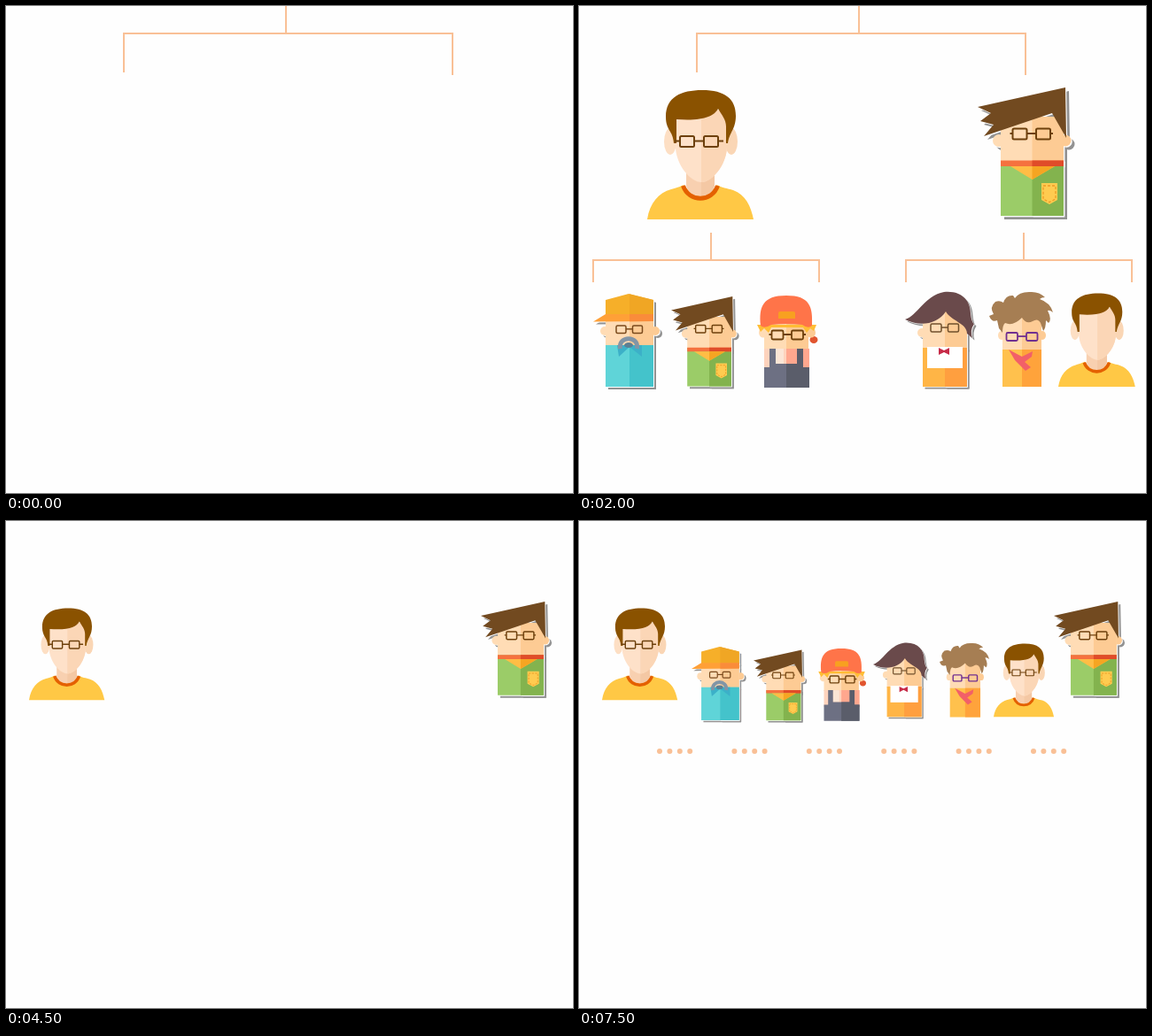
An HTML page with a canvas that plays this animation: 640 px wide and 550 px high, repeating every 8 s.

```html
<!DOCTYPE html>
<html lang="en">
<head>
<meta charset="utf-8">
<title>Team tree</title>
<style>
html, body { margin: 0; width: 100%; height: 100%; overflow: hidden; background: #fefefe; }
canvas { display: block; }
</style>
</head>
<body>
<canvas id="stage" width="640" height="550"></canvas>
<script>
const ctx = document.getElementById('stage').getContext('2d');
const LOOP = 8000;
const LINE = '#f9c096';
const SKIN = ['#ffdcb5', '#fdcb94'];
const BROWN = '#724a20';
let flat = null; // when set, every shape takes this colour (silhouettes)

function fill(d, color) {
  ctx.fillStyle = flat || color;
  ctx.fill(new Path2D(d));
}

// Left and right halves in two tones, divided at x.
function split(d, x, [left, right]) {
  fill(d, left);
  ctx.save();
  ctx.beginPath();
  ctx.rect(x, 0, 640, 550);
  ctx.clip();
  fill(d, right);
  ctx.restore();
}

function stroke(d, color, width, dash = []) {
  ctx.strokeStyle = flat || color;
  ctx.lineWidth = width;
  ctx.setLineDash(dash);
  ctx.stroke(new Path2D(d));
  ctx.setLineDash([]);
}

function oval(x, y, rx, ry, color) {
  ctx.fillStyle = flat || color;
  ctx.beginPath();
  ctx.ellipse(x, y, rx, ry, 0, 0, 2 * Math.PI);
  ctx.fill();
}

function glasses(x, y, w, h, gap, color, width = 1.7, arm = 0) {
  ctx.strokeStyle = flat || color;
  ctx.lineWidth = width;
  ctx.beginPath();
  ctx.roundRect(x, y, w, h, 1.5);
  ctx.roundRect(x + w + gap, y, w, h, 1.5);
  ctx.stroke();
  const mid = y + h * 0.45;
  stroke(`M${x - arm},${mid}H${x}M${x + w},${mid}h${gap}m${w},0h${arm}`, color, width);
}

function manBare() {
  oval(103, 153, 7, 15, '#fddfc4');
  oval(172, 153, 7, 15, '#fad6b5');
  fill('M77,241C80,222 90,211 104,207C112,205 116,203 118,202C124,214 150,214 156,202C160,205 168,206 174,208C188,213 194,226 197,241Z', '#ffc845');
  split('M121,186H153V203Q150,215 137,215Q124,215 121,203Z', 138, ['#f8d0b0', '#f4c8a4']);
  stroke('M117.5,203C124,222 150,222 156.5,203', '#e46000', 5);
  split('M109,125C109,112 167,112 167,125V160C166,180 150,199 138,199C126,199 110,180 109,160Z', 138, ['#fee1c9', '#fbd6b6']);
  fill('M107,155C106,140 98,141 98,125C98,103 115,95 139,95C165,95 177,105 177,124C177,139 170,142 168,155H166V136C166,128 161,123 157,116C152,125 140,130 110,128V155Z', '#8a5200');
}

function man() {
  manBare();
  glasses(114, 147, 16, 12, 11, '#6d400c', 2, 6);
}

function green() {
  oval(474, 152, 7, 7, '#ffdcb5');
  oval(549, 152, 6.5, 6.5, '#fdcb94');
  split('M476,125H547V176H476Z', 511.5, SKIN);
  split('M476,175H547V237H476Z', 511.5, ['#9bcc68', '#83b34e']);
  split('M476,174.5H547V181H476Z', 511.5, ['#f5713f', '#e04c29']);
  split('M487,181H537L511.5,196Z', 511.5, ['#ffbd45', '#f6a522']);
  fill('M450,114L549,92L550,149L534,121L457,147L468,134L453,130L465,121Z', BROWN);
  glasses(489.5, 138.5, 16, 12, 10.5, '#6d400c', 2, 3);
  fill('M522,200H540V219L531,224L522,219Z', '#ffcb50');
  stroke('M524,203H538V218L531,221.5L524,218Z', '#ee9b25', 1.3, [3, 2]);
}

function blue() {
  oval(29, 367, 5, 5, '#ffdcb5');
  oval(86, 367, 5, 5, '#fdcb94');
  split('M30,354H84V384H30Z', 57, SKIN);
  split('M30,383H84V430H30Z', 57, ['#5fd4d8', '#44c3cb']);
  fill('M43,383H71V396L57,385L45,396Z', '#3cb0c8');
  stroke('M46.5,387C44,372 68,372 65.5,387', '#8295a6', 5);
  oval(56, 383, 5, 3, '#5d7f93');
  split('M30,332L56,325L84,332V350H30Z', 57, ['#f6af29', '#f0a624']);
  split('M16,356.5L30,348H84V356Z', 57, ['#ffa037', '#fa8c3a']);
  glasses(42, 361, 11, 8.5, 7.5, '#7a4a1c', 1.5);
}

function redCap() {
  oval(265, 377, 4.5, 4, '#e1552f');
  oval(208, 369, 5, 5.5, '#ffdcb5');
  oval(262, 369, 5, 5.5, '#fdcb94');
  split('M209,356H259V388H209Z', 234, SKIN);
  split('M209,387H260V411H209Z', 234, ['#fed3bd', '#ffa78e']);
  fill('M222,387H231V404H222Z', '#fbe5d5');
  split('M209,408H215V387H222V404H246V387H253V408H260V431H209Z', 234, ['#6d7083', '#5a5d6a']);
  fill('M201,360H268L265,367L261,364L257,369L253,363H217L214,369L209,364L205,368Z', '#ffbd35');
  fill('M205,361C203,340 207,327 234,327C261,327 264,340 263,361Q259,365 252,360Q234,358 217,360Q209,365 205,361Z', '#ff7449');
  fill('M225,353V347Q225,345 227,345H242Q244,345 244,347V353Z', '#f8a020');
  glasses(217.5, 366.5, 13, 10, 9.5, '#6d400c', 1.8, 3);
}

function woman() {
  oval(387, 369, 5, 5, '#ffdcb5');
  split('M388,344H438V388H388Z', 413, SKIN);
  split('M388,386H438V430H388Z', 413, ['#ffb546', '#ff9f3f']);
  fill('M393,385H433V409H393Z', '#fff');
  fill('M406,386L412,389L418,386V394L412,391L406,394Z', '#c72b48');
  fill('M368,354C382,350 390,327 412,323C432,321 442,333 442,347Q443,357 446,359Q441,366 444,375L438,370C438,358 420,356 414,345C405,359 385,363 368,354Z', '#6a4a4b');
  glasses(397, 359, 12, 9, 7.5, '#70502c', 1.5);
}

function boy() {
  oval(477, 372, 4, 5, '#ffdcb5');
  oval(523, 372, 4, 5, '#fdcb94');
  split('M478,348H522V389H478Z', 500, SKIN);
  split('M478,388H522V430H478Z', 500, ['#ffc14d', '#ffa33b']);
  fill('M485,388L500,396L512,390L511,396L503,402L510,408L504,412L492,400Z', '#f26068');
  fill('M474,364L472,355Q466,358 463,350L468,348Q463,340 470,334Q475,332 479,335Q482,326 490,327L492,330Q497,322 511,323Q520,323 526,329Q522,329 520,331Q532,335 535,346Q531,343 529,344Q534,354 530,358Q528,356 527,355Q527,364 524,367L521,358Q518,352 512,356Q505,360 500,352Q490,362 481,358Q478,360 478,369Z', '#a67e53');
  glasses(482.5, 369, 12.5, 9, 10, '#703090', 1.8);
}

// Moves a figure's top-left corner (ox, oy) to (x, y), with an optional hard shadow.
function place(figure, ox, oy, x, y, scale = 1, shadow = 0) {
  const pass = (offset, color) => {
    flat = color;
    ctx.save();
    ctx.translate(x, y);
    ctx.scale(scale, scale);
    ctx.translate(offset - ox, offset - oy);
    figure();
    ctx.restore();
  };
  if (shadow) {
    pass(shadow, '#929292');
    pass(shadow * 0.3, '#fefefe');
  }
  pass(0, null);
}

const putMan = (x, y, s, figure = man) => place(figure, 77, 95, x, y, s);
const putGreen = (x, y, s) => place(green, 450, 92, x, y, s, 4);
const putBlue = (x, y, s) => place(blue, 16, 325, x, y, s, 3);
const putRedCap = (x, y, s) => place(redCap, 202, 327, x, y, s);
const putWoman = (x, y, s) => place(woman, 368, 322, x, y, s, 2.5);
const putBoy = (x, y, s) => place(boy, 463, 323, x, y, s);

function bracket(stem, top, left, right, y, leftEnd, rightEnd = leftEnd) {
  stroke(`M${stem},${top}V${y}M${left},${leftEnd}V${y}H${right}V${rightEnd}`, LINE, 2);
}

function dots(x, y) {
  for (let i = 0; i < 4; i++) oval(x + i * 11.4, y, 3, 3, LINE);
}

function drawTree(t) {
  bracket(316, 0, 133, 504, 31, 75, 78);
  if (t >= 500) {
    putMan(77, 95, 1);
    putGreen(450, 92, 1);
  }
  if (t >= 1000) {
    bracket(149, 256, 16, 271, 287, 312);
    putBlue(16, 325, 1);
    putGreen(104, 328, 0.7);
    putRedCap(202, 327, 1);
  }
  if (t >= 2000) {
    bracket(502, 256, 369, 624, 287, 312);
    putWoman(368, 322, 1);
    putBoy(463, 323, 1);
    putMan(541, 324.5, 0.723, manBare);
  }
  if (t >= 3000) {
    for (const x of [53, 148, 239, 413, 504, 592]) {
      bracket(x, 441, x - 26, x + 26, 462, 474);
      dots(x - 17, 482);
    }
  }
}

function drawRow(t) {
  if (t >= 4500) {
    putMan(26, 98.5, 0.71);
    putGreen(536, 91, 0.73);
  }
  if (t >= 5500) {
    putBlue(127, 142, 0.79);
    putGreen(197, 145.5, 0.55);
    putRedCap(271, 144, 0.785);
  }
  if (t >= 6500) {
    putWoman(332, 137, 0.78);
    putBoy(407, 138, 0.78);
    putMan(468, 138.5, 0.567);
  }
  if (t >= 7500) {
    for (let i = 0; i < 6; i++) dots(91 + i * 84.4, 260);
  }
}

function frame() {
  const t = performance.now() % LOOP;
  ctx.fillStyle = '#fefefe';
  ctx.fillRect(0, 0, 640, 550);
  if (t < 4000) drawTree(t);
  else drawRow(t);
  requestAnimationFrame(frame);
}
frame();
</script>
</body>
</html>
```
